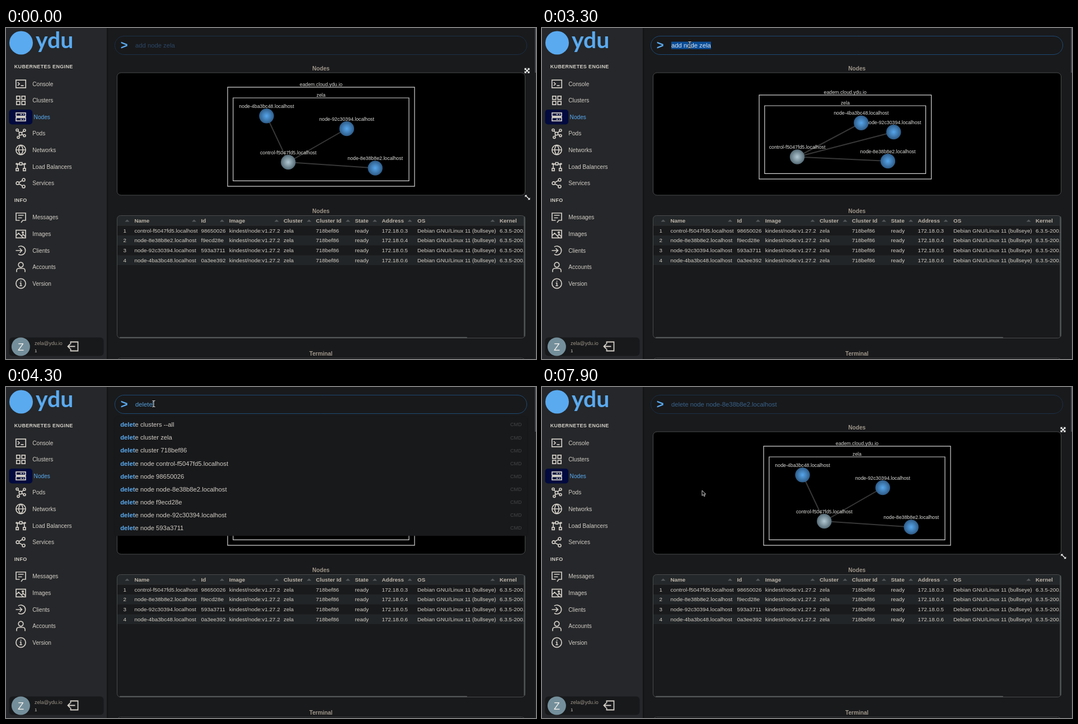
These frames come from a looping animation (947 by 592 pixels, 8 s). An HTML page with a canvas:

```html
<!DOCTYPE html>
<html lang="en">
<head>
<meta charset="utf-8">
<title>Cluster console</title>
<style>
html, body { margin: 0; width: 100%; height: 100%; overflow: hidden; background: #191a1c; }
canvas { display: block; }
</style>
</head>
<body>
<canvas id="stage" width="947" height="592"></canvas>
<script>
const g = document.getElementById('stage').getContext('2d');
const LOOP = 8000, STEP = 100;
const BG = '#191a1c', INK = '#d3cec6', MUTED = '#9f968a', BLUE = '#5aaaf0';
const SANS = '"Liberation Sans", Arial, sans-serif';
const USER = 'zela', BRAND = 'ydu', CONTROL = 'control-f5047fd5.localhost';

function text(s, x, y, size, color, { weight = 400, align = 'left', family = SANS, spacing = 0 } = {}) {
  g.font = `${weight} ${size}px ${family}`;
  g.letterSpacing = spacing + 'px';
  g.textAlign = align;
  g.fillStyle = color;
  g.fillText(s, x, y + size * 0.36);
  return g.measureText(s).width;
}

function box(x, y, w, h, r, fill, stroke, width = 1) {
  g.beginPath();
  g.roundRect(x, y, w, h, r);
  if (fill) { g.fillStyle = fill; g.fill(); }
  if (stroke) { g.strokeStyle = stroke; g.lineWidth = width; g.stroke(); }
}

function path(d, x, y, stroke, width = 1.7, fill) {
  const p = new Path2D(d);
  g.save();
  g.translate(x, y);
  if (fill) { g.fillStyle = fill; g.fill(p); }
  if (stroke) { g.strokeStyle = stroke; g.lineWidth = width; g.stroke(p); }
  g.restore();
}

function disc(x, y, r, fill) {
  g.beginPath();
  g.arc(x, y, r, 0, 7);
  g.fillStyle = fill;
  g.fill();
}

const ring = (x, y, r) => `M${x + r} ${y}a${r} ${r} 0 1 0 ${-2 * r} 0a${r} ${r} 0 1 0 ${2 * r} 0`;
const rect = (x, y, w, h = w) => `M${x} ${y}h${w}v${h}h${-w}z`;

const menu = [
  ['Console', 100, rect(-8.7, -6.8, 17.4, 13.6) + 'M-5.5 -3l3 3l-3 3M0 3.2h5'],
  ['Clusters', 129.5, rect(-7.7, -7.7, 6) + rect(1.7, -7.7, 6) + rect(-7.7, 1.7, 6) + rect(1.7, 1.7, 6)],
  ['Nodes', 159, rect(-8.5, -7.2, 17, 5.8) + rect(-8.5, 1.4, 17, 5.8) + 'M-8.5 0h17M-1 -4.3h3M-1 4.3h3M4 -4.3h2M4 4.3h2'],
  ['Pods', 188.5, ring(-0.5, 0.5, 2.7) + ring(-6.5, -6, 2) + ring(6.5, -5.5, 2) + ring(-4.5, 7, 2) + ring(6.5, 4, 2)
    + 'M-5 -4.5l2.6 3M5 -4.2l-3.6 3M-3.4 5.2l1.5 -2.4M4.6 3.3l-2.6 -1.5'],
  ['Networks', 218, ring(0, 0, 8.6) + 'M-8.6 0h17.2M0 -8.6c-5 5 -5 12.2 0 17.2c5 -5 5 -12.2 0 -17.2'],
  ['Load Balancers', 248, rect(-2.2, -7.5, 4.4) + rect(-8.5, 3.2, 4.2) + rect(4.3, 3.2, 4.2)
    + ring(-7.5, -5, 1) + ring(7.5, -5, 1) + 'M-6.4 3v-3q0 -5 4 -5M6.4 3v-3q0 -5 -4 -5M-6 -5h4M2 -5h4'],
  ['Services', 277.5, ring(-5.7, 0, 2.7) + ring(5, -6, 2.5) + ring(5, 6, 2.5) + 'M-3.3 -1.3l6 -3.4M-3.3 1.3l6 3.4'],
  ['Messages', 338.5, 'M-2 5.5h-6.5v-13h17v13h-5l-3 4M-5 -3.5h10M-5 1h7'],
  ['Images', 368.5, rect(-8.5, -6.8, 17, 13.6) + ring(3.5, -2.7, 1.3) + 'M-8.5 3l4.5 -4.5l8 8M1.5 3l2.5 -2.5l4.5 4.5'],
  ['Clients', 398, 'M-4.5 -6.5a8 8 0 1 1 0 13M-9 0h10.5M-2 -4l4 4l-4 4'],
  ['Accounts', 427.5, ring(0, -4, 4.3) + 'M-7.5 9v-2.5q0 -4 4 -4h7q4 0 4 4v2.5'],
  ['Version', 457, ring(0, 0, 8.6) + 'M-1.8 -.8h1.9v4.6M-2.2 4h4.5M-.7 -4.2h1.6']
];

const columns = [
  ['', 209.5, 216.5], ['Name', 229.5, 336], ['Id', 348.5, 386], ['Image', 398.7, 483.5], ['Cluster', 496, 541.5],
  ['Cluster Id', 553.8, 611], ['State', 623.5, 659], ['Address', 671.5, 721.5], ['OS', 735, 869.5], ['Kernel', 882]
];
const hosts = [
  [CONTROL, '98650026'],
  ['node-8e38b8e2.localhost', 'f9ecd28e'],
  ['node-92c30394.localhost', '593a3711'],
  ['node-4ba3bc48.localhost', '0a3ee392']
];
const rows = hosts.map(([name, id], i) => [i + 1, name, id, 'kindest/node:v1.27.2', USER, '718bef86', 'ready',
  '172.18.0.' + (i + 3), 'Debian GNU/Linux 11 (bullseye)', '6.3.5-200.fc38']);

const commands = [
  'get nodes --all', 'delete clusters --all',
  ...[USER, '718bef86'].flatMap(c => ['add node ' + c, 'delete cluster ' + c, 'get nodes ' + c]),
  'start node ' + CONTROL, 'stop node ' + CONTROL,
  ...hosts.flat().map(h => 'delete node ' + h)
];

// Four hosts, then two opposite corners of the inner frame
const settled = [[504.3, 240], [659.7, 250.5], [608.8, 180], [465.5, 157.3], [405.8, 125], [720, 273.3]];
const moving = [[456, 230.5], [618, 238], [628.3, 186], [570.3, 169.7], [397.8, 139], [685.6, 260.3]];
const compact = moving.map(([x, y], i) => i < 4
  ? [562 + (x - 548) * 0.5, 189 + (y - 202) * 0.5]
  : [562 + (i - 4.5) * 210, 189 + (i - 4.5) * 88]);

const mix = (a, b, k) => a.map((v, i) => v + (b[i] - v) * k);
const easeOut = k => 1 - (1 - k) ** 2;

function layout(t) {
  if (t < 3000 || t >= 4100) return settled;
  const [from, to, k] = t < 3300 ? [compact, moving, (t - 3000) / 300] : [moving, settled, (t - 3300) / 800];
  return from.map((p, i) => mix(p, to[i], easeOut(k)));
}

const mouseKeys = [[1900, 259, 47], [2600, 264, 30], [4800, 264, 30], [5300, 269, 210], [5700, 276, 165], [6600, 286, 185], [LOOP, 286, 185]];
function mouseAt(t) {
  const i = mouseKeys.findIndex(k => t < k[0]);
  const [a, b] = [mouseKeys[i - 1], mouseKeys[i]];
  const k = (t - a[0]) / (b[0] - a[0]);
  return mix(a, b, k * k * (3 - 2 * k)).slice(1);
}

const keyTimes = [3500, 3800, 3900, 4000, 4200, 4300];
const typed = t => 'delete'.slice(0, keyTimes.filter(k => k <= t).length);

function drawSidebar() {
  box(0, 0, 180, 592, 0, '#25272a');
  const shade = g.createLinearGradient(180, 0, 184, 0);
  shade.addColorStop(0, '#111214');
  shade.addColorStop(1, BG);
  box(180, 0, 4, 592, 0, shade);
  disc(27, 26.5, 21, BLUE);
  text(BRAND, 53, 21.5, 41, BLUE, { weight: 700, family: 'Lato, sans-serif' });
  text('KUBERNETES ENGINE', 14.7, 69, 9, INK, { weight: 700, spacing: 0.35 });
  text('INFO', 14.7, 308, 9, INK, { weight: 700, spacing: 0.35 });
  box(5.5, 146, 41.7, 26.5, 5, '#020a3e');
  for (const [name, y, icon] of menu) {
    const active = name === 'Nodes';
    path(icon, 26.5, y, INK);
    text(name, active ? 49.6 : 47.2, y, 10.15, active ? BLUE : INK);
  }
  box(5.5, 553.5, 169, 33, 6, '#18191b');
  disc(26.4, 570, 16.5, '#748f9b');
  text(USER[0].toUpperCase(), 26.4, 570.3, 18, '#f0eeea', { align: 'center' });
  text(`${USER}@${BRAND}.io`, 51, 564, 9, MUTED);
  text('1', 51, 577, 8, INK);
  path('M-4 -4v-4h13v16h-13v-4M4 0h-13M-5 -4l-4 4l4 4', 119.5, 569.5, INK, 1.8);
}

function drawGraph(t) {
  box(198.5, 80, 729, 219, 7, '#000', '#494b4d');
  const pts = layout(t), [[x0, y0], [x1, y1]] = pts.slice(4), mid = (x0 + x1) / 2;
  const label = (s, x, y) => text(s, x, y, 8.8, '#dededc', { align: 'center' });
  box(x0, y0, x1 - x0, y1 - y0, 0, null, '#d4d4d4', 1.2);
  box(x0 - 9.8, y0 - 19.2, x1 - x0 + 19.8, y1 - y0 + 29, 0, null, '#d4d4d4', 1.2);
  label(`eadem.cloud.${BRAND}.io`, mid, y0 - 24);
  label(USER, mid, y0 - 4.7);
  for (const [x, y] of pts.slice(1, 4)) path(`M${pts[0]}L${x} ${y}`, 0, 0, '#383838', 2);
  hosts.forEach(([name], i) => {
    const [x, y] = pts[i], glow = g.createRadialGradient(x, y, 0, x, y, 13.2);
    const [inner, outer] = i ? ['#56a6ec', '#2f5c88'] : ['#b2c9d3', '#566c77'];
    glow.addColorStop(0, inner);
    glow.addColorStop(1, outer);
    disc(x, y, 13.2, glow);
    label(name, x, y - 17.6);
  });
}

function drawTable() {
  g.save();
  box(198.5, 335.5, 729, 219, 6, BG);
  g.clip();
  box(198, 335, 730, 17.5, 0, '#25282a');
  box(198, 352.5, 730, 1, 0, '#303335');
  for (const y of [371, 406.4]) box(198, y, 730, 17.7, 0, '#222527');
  g.beginPath();
  g.rect(198, 335, 728, 220);
  g.clip();
  columns.forEach(([name, x, sortX], c) => {
    text(name, x, 344, 9.87, '#bdb5aa', { weight: 700 });
    if (sortX) path('M-4 2l4 -4l4 4z', sortX, 344.5, null, 0, '#56595b');
    rows.forEach((row, r) => text(row[c], x, 362 + r * 17.7, 9.87, INK));
  });
  g.restore();
  box(198.5, 335.5, 729, 219, 6, null, '#494b4d');
  box(925.3, 337, 2.2, 215, 1, '#505355');
  box(203, 552.8, 621, 1.8, 1, '#595c5e');
}

function drawPrompt(t) {
  const focused = t >= 2700 && t < 7900;
  box(194.5, 14.5, 736, 33, 16.5, '#18191b', focused ? '#1d4a74' : '#1b3048');
  text('>', 204.7, 30.4, 22, BLUE, { weight: 700 });
  const picked = t >= 7800, selected = t >= 2800 && t < 3500;
  const value = picked ? 'delete node ' + hosts[1][0] : t < 3500 ? 'add node ' + USER : typed(t);
  const color = selected ? '#d5e3f2' : focused ? '#539dd8' : picked ? '#38628a' : '#2b4767';
  if (selected) box(231, 24.6, 71, 13.2, 0, '#0b4d97');
  const width = text(value, 231, 31, 11.28, color);
  const caretOn = t < 4300 || Math.floor((t - 4300) / 600) % 2 === 0;
  if (t >= 3500 && !picked && caretOn) box(231.2 + width, 25, 1, 12, 0, '#79b8e8');
}

function drawSuggestions(t, mouse) {
  if (t < 3600 || t >= 7800) return;
  const query = typed(t - 100) || 'd';
  const limit = query.length > 2 && query.length < 6 ? 9 : 10;
  const list = commands.filter(c => c.includes(query)).slice(0, limit);
  g.save();
  g.shadowColor = 'rgba(0,0,0,.25)';
  g.shadowBlur = 4;
  box(195, 53.5, 736, list.length * 23.1 + 4.8, 4, '#18191b');
  g.restore();
  list.forEach((command, i) => {
    const y = 67.2 + i * 23.1, at = command.indexOf(query), end = at + query.length;
    if (t >= 4900 && Math.abs(mouse[1] - y) < 11.5) box(197, y - 10.2, 731, 20.4, 3, '#17212b');
    let x = 204.2;
    x += text(command.slice(0, at), x, y, 11.28, INK);
    x += text(command.slice(at, end), x, y, 11.28, BLUE, { weight: 700 });
    text(command.slice(end), x, y, 11.28, INK);
    text('CMD', 921.5, y, 9, '#434547', { align: 'right' });
  });
}

function drawMouse(t, [x, y]) {
  if (y < 52) {
    const beam = 'M-2.6 -5.5h1.6l1 1l1 -1h1.6M0 -4.5v9M-2.6 5.5h1.6l1 -1l1 1h1.6';
    path(beam, x, y, '#000', 2.6);
    path(beam, x, y, '#e4e4e4', 1.1);
  } else if (t < 7800) {
    path('M-1.5 4v-5q1 -1.5 2 0v3l4 1q1.5 .5 1 2.5l-.7 3h-4.6l-3 -4q.2 -1.2 1.3 -.5z', x, y, '#e8e8e8', 0.9, '#000');
  } else {
    path('M0 0v9.3l2.2 -2l1.5 3.3l1.6 -.7l-1.5 -3.2h2.8z', x, y, '#e8e8e8', 0.9, '#000');
  }
}

function drawHandles() {
  path('M-3 -3l6 6M-3 3l6 -6', 931, 76.3, '#eee', 1.8);
  path('M-4.5 -4.5h4l-4 4zM4.5 -4.5v4l-4 -4zM-4.5 4.5v-4l4 4zM4.5 4.5h-4l4 -4z', 931, 76.3, null, 0, '#eee');
  path('M-3 -3l6 6', 931.8, 303, '#eee', 1.4);
  path('M-4.5 -4.2h4l-4 4zM4.5 4.2h-4l4 -4z', 931.8, 303, null, 0, '#eee');
}

function draw(t) {
  box(0, 0, 947, 592, 0, BG);
  drawSidebar();
  for (const [title, y] of [['Nodes', 72], ['Nodes', 327.5], ['Terminal', 582]])
    text(title, 562.7, y, 10.15, MUTED, { weight: 700, align: 'center' });
  drawGraph(t);
  drawTable();
  box(198.5, 590.5, 729, 40, 6, '#000', '#494b4d');
  box(945, 0, 2, 592, 0, '#202224');
  box(945, 0, 2, 80, 0, '#484c4f');
  if (t < 1900 || t >= 7900) drawHandles();
  drawPrompt(t);
  if (t < 1900) return;
  const mouse = mouseAt(t);
  drawSuggestions(t, mouse);
  drawMouse(t, mouse);
}

// The screen updates ten times a second
function tick() {
  draw(Math.floor(performance.now() % LOOP / STEP) * STEP);
  requestAnimationFrame(tick);
}
tick();
</script>
</body>
</html>
```
